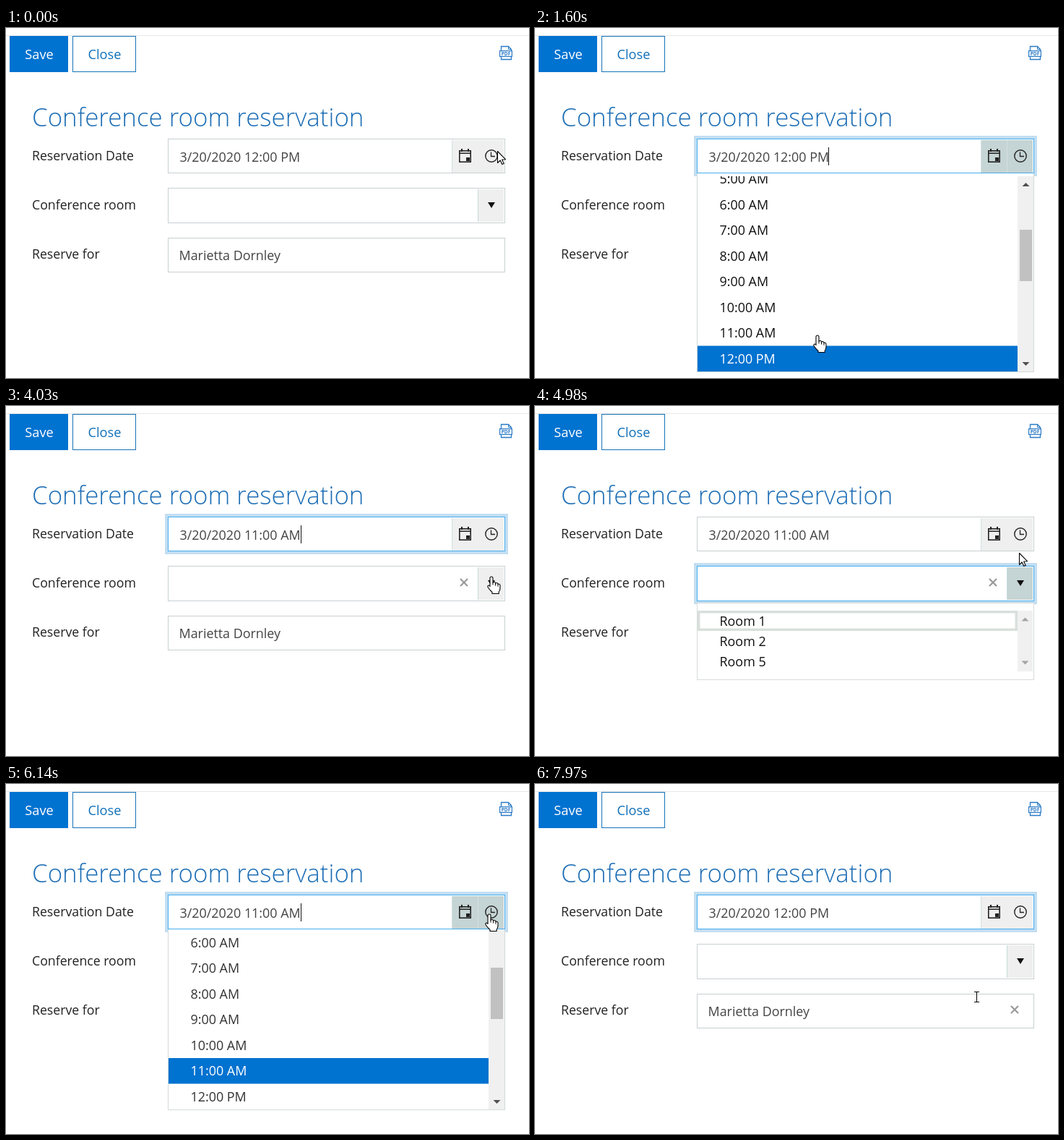
These frames come from a looping animation (724x484 px, 8000 ms). An HTML page with a canvas:

```html
<!DOCTYPE html>
<html lang="en">
<head>
<meta charset="utf-8">
<title>Room reservation form</title>
<style>
html, body { margin: 0; width: 100%; height: 100%; overflow: hidden; background: #fff; }
canvas { display: block; }
</style>
</head>
<body>
<canvas id="stage" width="724" height="484"></canvas>
<script>
const ctx = document.getElementById('stage').getContext('2d');
const LOOP = 8000;
const FAMILY = '"Open Sans", "Noto Sans", sans-serif';
const BLUE = '#0072d0';
const POPUP_H = 274;
const ROW_H = 35.5;
const HOURS = ['5:00 AM', '6:00 AM', '7:00 AM', '8:00 AM', '9:00 AM', '10:00 AM', '11:00 AM', '12:00 PM'];
const ROOMS = ['Room 1', 'Room 2', 'Room 5'];

// Pointer stops: time, x, y
const PATH = [
  [0, 680, 170], [1090, 680, 170], [1520, 391, 425], [2050, 391, 425], [2360, 393, 420],
  [2860, 393, 420], [3340, 672, 236], [4860, 672, 236], [4980, 670, 203], [5190, 669, 180],
  [6430, 669, 180], [6980, 329, 450], [7480, 329, 450], [7940, 611, 294], [8000, 611, 294]
];

// Spans in which each caret is lit
const DATE_CARET = [[60, 590], [1090, 1620], [2080, 3110], [3630, 4050], [5840, 6430], [6960, 7840]];
const ROOM_CARET = [[4060, 4530], [5040, 5520]];

const clamp = v => Math.max(0, Math.min(1, v));
const ramp = (t, a, b) => clamp((t - a) / (b - a));
const easeOut = p => 1 - (1 - p) * (1 - p);
const smooth = p => p * p * (3 - 2 * p);
const within = (t, a, b) => t >= a && t < b;
const lit = (t, spans) => spans.some(([a, b]) => within(t, a, b));

function mix(from, to, p) {
  return `rgb(${from.map((v, i) => Math.round(v + (to[i] - v) * p)).join(',')})`;
}

function rect(x, y, w, h, color) {
  ctx.fillStyle = color;
  ctx.fillRect(x, y, w, h);
}

function frame(x, y, w, h, color, width = 1) {
  ctx.strokeStyle = color;
  ctx.lineWidth = width;
  ctx.strokeRect(x + width / 2, y + width / 2, w - width, h - width);
}

function text(str, x, y, color = '#222', size = 17.7, weight = 400, align = 'left') {
  ctx.font = `${weight} ${size}px ${FAMILY}`;
  ctx.fillStyle = color;
  ctx.textAlign = align;
  ctx.fillText(str, x, y);
}

function line(points, color, width) {
  ctx.strokeStyle = color;
  ctx.lineWidth = width;
  ctx.beginPath();
  points.forEach(([x, y]) => ctx.lineTo(x, y));
  ctx.stroke();
}

function triangle(x, y, half, height, color) {
  ctx.fillStyle = color;
  ctx.beginPath();
  ctx.moveTo(x - half, y - height / 2);
  ctx.lineTo(x + half, y - height / 2);
  ctx.lineTo(x, y + height / 2);
  ctx.fill();
}

function clearMark(x, y, alpha) {
  ctx.globalAlpha = alpha;
  line([[x - 5, y - 5], [x + 5, y + 5]], '#999', 2.2);
  line([[x + 5, y - 5], [x - 5, y + 5]], '#999', 2.2);
  ctx.globalAlpha = 1;
}

function pdfIcon() {
  const c = '#2a7ac6';
  line([[685.5, 32], [685.5, 25.5], [695.5, 25.5], [699.5, 29.5], [699.5, 32]], c, 1.3);
  line([[695.5, 25.5], [695.5, 29.5], [699.5, 29.5]], c, 1);
  line([[685.5, 39], [685.5, 43.5], [699.5, 43.5], [699.5, 39]], c, 1.3);
  frame(683, 31, 18, 9, c, 1.2);
  text('PDF', 692, 38.2, c, 6.5, 700, 'center');
}

function calendarIcon() {
  frame(627, 169, 17, 17, '#222', 1.6);
  rect(627, 172.5, 17, 1.5, '#222');
  rect(630, 167, 2, 4, '#222');
  rect(639, 167, 2, 4, '#222');
  rect(637, 179, 5, 5, '#222');
}

function clockIcon() {
  ctx.strokeStyle = '#222';
  ctx.lineWidth = 1.4;
  ctx.beginPath();
  ctx.arc(672, 177, 8.2, 0, Math.PI * 2);
  ctx.stroke();
  line([[671.5, 171.5], [671.5, 177.5], [677, 177.5]], '#222', 1.3);
}

function field(y, h, focus) {
  if (focus > 0) {
    ctx.globalAlpha = focus;
    rect(220, y - 4, 475, h + 8, '#c2def2');
    ctx.globalAlpha = 1;
  }
  rect(224, y, 467, h, '#fff');
  frame(224, y, 467, h, mix([200, 208, 210], [72, 174, 238], focus));
}

function header() {
  rect(0, 10, 724, 1, '#e9e9e9');
  rect(5, 11, 81, 50, BLUE);
  text('Save', 46, 43, '#fff', 18.2, 400, 'center');
  frame(92, 11, 88, 50, '#1573b8');
  text('Close', 136.5, 43, '#1170b8', 18.2, 400, 'center');
  pdfIcon();
  text('Conference room reservation', 36, 135.5, '#1c6db5', 34.9, 300);
  text('Reservation Date', 36, 183);
  text('Conference room', 36, 251);
  text('Reserve for', 36, 319);
}

function dateField(t) {
  const focus = t < 3000 ? ramp(t, 60, 220) : t < 5000 ? 1 - ramp(t, 4030, 4150) : ramp(t, 5790, 5920);
  const active = t < 1500 ? ramp(t, 60, 300)
    : t < 5000 ? 1 - ramp(t, 2700, 2890)
    : t < 7000 ? ramp(t, 5790, 5950) : 1 - ramp(t, 7400, 7600);
  const eleven = within(t, 2620, 7310);
  field(153, 48, focus);
  rect(617, 155, 72, 45, mix([239, 239, 239], [197, 212, 212], active));
  rect(617, 155, 1, 45, '#d3e0df');
  if (active > 0) rect(653, 155, 1, 45, '#d3e0df');
  calendarIcon();
  clockIcon();
  text(`3/20/2020 ${eleven ? '11:00 AM' : '12:00 PM'}`, 240.5, 185, '#444', 17.9);
  if (lit(t, DATE_CARET)) rect(eleven ? 408 : 406, 165, 1, 25, '#111');
}

function roomField(t) {
  const focus = ramp(t, 4030, 4150) - ramp(t, 5790, 5920);
  field(221, 49, focus);
  rect(653, 223, 36, 45, mix([239, 239, 239], [197, 212, 212], focus));
  rect(653, 223, 1, 45, '#c8dcda');
  triangle(672, 245, 5, 8, '#111');
  const mark = ramp(t, 3230, 3330) - ramp(t, 5040, 5170);
  if (mark > 0) clearMark(634, 244, mark);
  if (lit(t, ROOM_CARET)) rect(240, 233, 1, 25, '#111');
}

function nameField(hovered) {
  field(290, 48, 0);
  text('Marietta Dornley', 239.5, 321, '#444', 17.9);
  if (hovered) clearMark(664, 312, 1);
}

function slideIn(top, height, open, draw) {
  ctx.save();
  ctx.beginPath();
  ctx.rect(224, top, 467, height + 1);
  ctx.clip();
  ctx.translate(0, -Math.round(height * (1 - open)));
  draw();
  ctx.restore();
}

function hourList(selected, moving, closing) {
  rect(224, 201, 467, POPUP_H, '#fff');
  rect(224, 201, 1, POPUP_H, '#d3dada');
  rect(690, 201, 1, POPUP_H, '#d3dada');
  ctx.save();
  ctx.beginPath();
  ctx.rect(225, 205, 465, POPUP_H - 4);
  ctx.clip();
  HOURS.forEach((hour, i) => {
    const y = 475 - ROW_H * (HOURS.length - i);
    const chosen = i === selected;
    if (chosen) rect(225, y, 443, ROW_H, closing ? '#1a7cd7' : BLUE);
    else if (closing && i >= 6) rect(225, y, 443, ROW_H, '#ededed');
    text(hour, 255.5, y + 24.2, chosen ? '#fff' : moving ? '#333' : '#111', 17.9);
  });
  rect(668, 205, 22, 270, '#f0f0f0');
  rect(671, 279, 17, 71, '#c1c1c1');
  triangle(679.5, 216.5, 5, -5, '#505050');
  triangle(679.5, 464.5, 5, 5, '#505050');
  ctx.restore();
  rect(224, 475, 467, 1, '#d3dada');
}

function roomList() {
  rect(224, 272, 467, 107, '#fff');
  frame(224, 272, 467, 107, '#d6dbda');
  rect(668, 283, 21, 84, '#f0f0f0');
  frame(225, 283, 443, 28, '#d9e0dc', 3.5);
  ROOMS.forEach((room, i) => text(room, 255.5, 303.5 + 28 * i, '#111', 17.9));
  triangle(678.5, 295, 5, -5, '#a3a3a3');
  triangle(678.5, 355, 5, 5, '#a3a3a3');
}

function popups(t) {
  const shut = t < 4000 ? 2620 : 7316;
  const begin = t < 4000 ? 560 : 5960;
  const open = easeOut(ramp(t, begin, begin + 260)) - easeOut(ramp(t, shut, shut + 180));
  if (open > 0.002) {
    slideIn(201, POPUP_H, open, () => hourList(t < 4000 ? 7 : 6, open < 1 || t > 5000, t > shut));
  }
  const rooms = easeOut(ramp(t, 4060, 4270)) - easeOut(ramp(t, 5780, 5900));
  if (rooms > 0.002) slideIn(272, 107, rooms, roomList);
}

function pointerAt(t) {
  const i = Math.max(1, PATH.findIndex(stop => stop[0] > t));
  const [t0, x0, y0] = PATH[i - 1];
  const [t1, x1, y1] = PATH[i];
  const p = smooth(ramp(t, t0, t1));
  return [x0 + (x1 - x0) * p, y0 + (y1 - y0) * p];
}

function pointerShape(t, x, y) {
  if (t < 60) return arrow;
  if (t < 2860 || within(t, 5960, 7480)) return hand;
  const inField = x > 224 && x < 691;
  if (inField && (within(y, 153, 201) && x > 617 || within(y, 221, 270) && x > 653)) return hand;
  if (inField && [153, 221, 290].some(top => within(y, top, top + 48))) return beam;
  return arrow;
}

function outline(path) {
  ctx.fillStyle = '#fff';
  ctx.strokeStyle = '#000';
  ctx.lineWidth = 1.1;
  ctx.lineJoin = 'round';
  ctx.fill(path);
  ctx.stroke(path);
  ctx.lineJoin = 'miter';
}

const ARROW = new Path2D('M.5 .5V16.5L4.2 13 6.8 18.6 9.2 17.6 6.7 12 11.5 11.7Z');
const HAND = new Path2D('M-2 2Q-2 0 0 0Q2 0 2 2V8Q5 6.5 5.5 9Q8.4 7.7 9 10.2Q11.6 9.7 12 12V16Q12 19 10.2 21V23.5H1V21.5Q-2 19 -5 14.5Q-5.4 12 -3.5 12Q-2.6 12 -2 13.5Z');

function arrow() { outline(ARROW); }

function hand() {
  outline(HAND);
  [[2, 8], [5.5, 9], [9, 10.2]].forEach(([x, y]) => line([[x, y], [x, y + 3.5]], '#000', 1));
}

function beam() {
  rect(0, -7, 1, 15, '#000');
  [-7, 7].forEach(y => {
    rect(-3, y, 3, 1, '#000');
    rect(1, y, 3, 1, '#000');
  });
}

function render(t) {
  const [x, y] = pointerAt(t);
  const shape = pointerShape(t, x, y);
  rect(0, 0, 724, 484, '#fff');
  header();
  roomField(t);
  nameField(shape === beam && y > 289);
  dateField(t);
  popups(t);
  ctx.save();
  ctx.translate(Math.round(x), Math.round(y));
  shape();
  ctx.restore();
}

const start = performance.now();
function tick() {
  render((performance.now() - start) % LOOP);
  requestAnimationFrame(tick);
}
tick();
</script>
</body>
</html>
```
